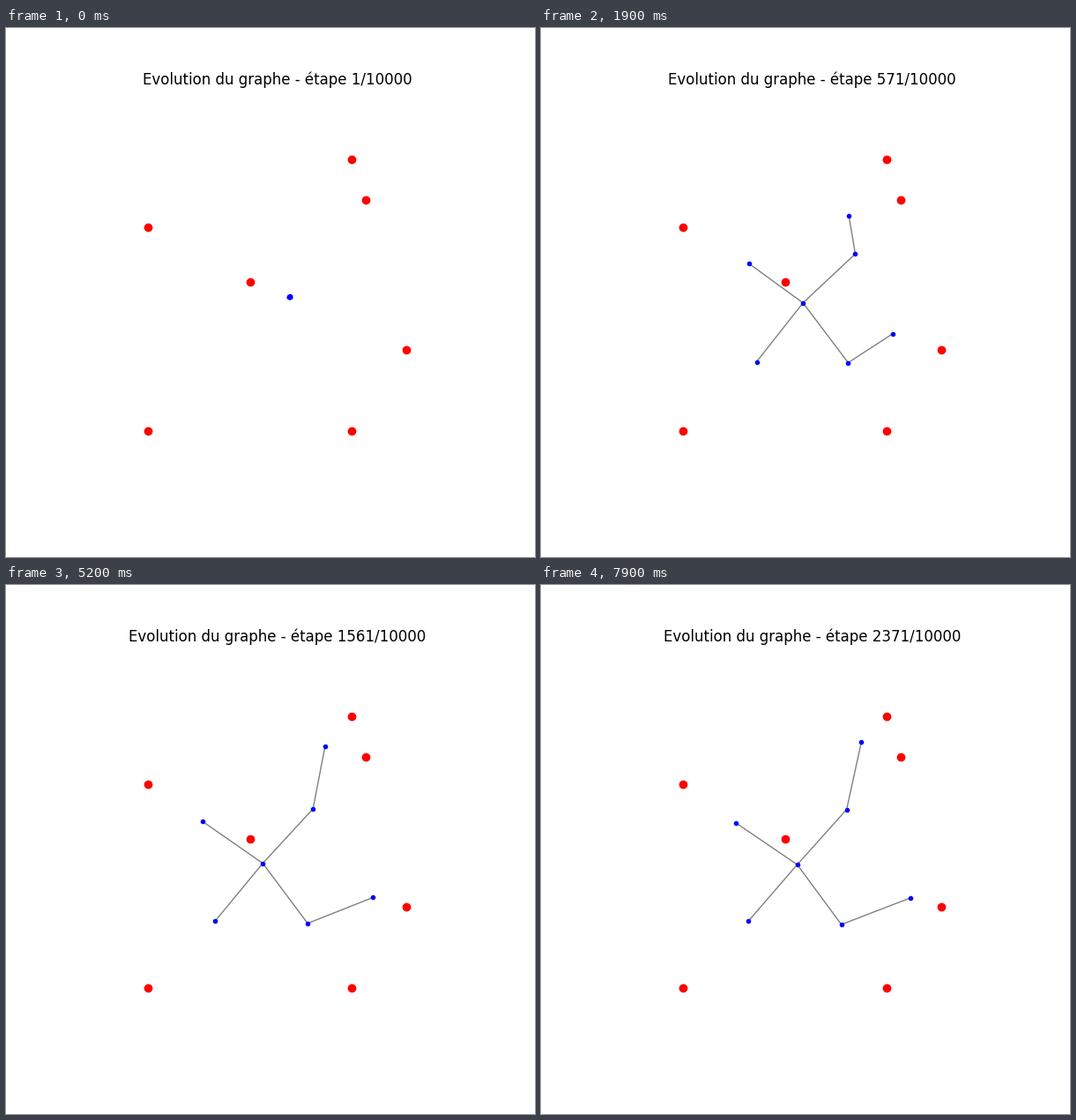
Recreate the animation shown at these times as a matplotlib script. Size 600 by 600 pixels, loop 8 s.

```python
import numpy as np
import matplotlib.pyplot as plt
from matplotlib.animation import FuncAnimation
from matplotlib.collections import LineCollection
from itertools import combinations

SIZE, FRAMES, INTERVAL = 600, 80, 100
STEPS_PER_FRAME, TOTAL = 30, 10000
REACH = 85           # longest possible link, in pixels
SPREAD_TIME = 10     # frames of free flight before the tethers go taut
SPREAD_RATE = 0.062  # how fast nodes fly apart
SETTLE_TIME = 18     # time constant of the drift to rest

targets = np.array([(392, 149), (408, 195), (161, 226), (277, 288),
                    (454, 365), (161, 457), (392, 457)])

# Hub first, then each node after the one it is tethered to
parents = [None, 0, 0, 0, 0, 2, 3]
start = np.array((321, 305))
spread = np.array([(305, 308), (258, 271), (356, 264), (349, 366),
                   (258, 369), (337, 246), (375, 335)])  # at frame 8
rest = np.array([(290, 317), (220, 269), (346, 254), (341, 385),
                 (235, 382), (364, 177), (420, 356)])

rng = np.random.default_rng(4)
wobble = rng.uniform(-0.7, 0.7, (FRAMES, len(parents), 2))


def fly_out(t):
    ease = np.expm1(-SPREAD_RATE * t) / np.expm1(-SPREAD_RATE * 8)
    return start + (spread - start) * ease


def positions(i):
    pos = fly_out(min(i, SPREAD_TIME))
    if i > SPREAD_TIME:
        decay = np.exp((SPREAD_TIME - i) / SETTLE_TIME)
        pos = rest + (pos - rest) * decay
    pos = pos + wobble[i]
    for child, parent in enumerate(parents[1:], 1):
        arm = pos[child] - pos[parent]
        pos[child] = pos[parent] + arm * min(1, REACH / np.hypot(*arm))
    return pos


def links(pos):
    return [(a, b) for a, b in combinations(pos, 2)
            if np.hypot(*(a - b)) < REACH + 0.1]


fig = plt.figure(figsize=(SIZE / 100, SIZE / 100), dpi=100, facecolor="white")
ax = fig.add_axes([0, 0, 1, 1])
ax.set_xlim(0, SIZE)
ax.set_ylim(SIZE, 0)
ax.axis("off")

edges = LineCollection([], colors="gray", linewidths=1, zorder=1)
ax.add_collection(edges)
ax.plot(*targets.T, "o", color="red", markersize=6, zorder=2)
nodes, = ax.plot([], [], "o", color="blue", markersize=3, zorder=3)
title = fig.text(0.5125, 0.88 + 6 / 72 / 6, "", ha="center", va="baseline",
                 fontsize=12, family="DejaVu Sans")


def update(i):
    pos = positions(i)
    edges.set_segments(links(pos))
    nodes.set_data(*pos.T)
    step = 1 + STEPS_PER_FRAME * i
    title.set_text(f"Evolution du graphe - étape {step}/{TOTAL}")
    return edges, nodes, title


anim = FuncAnimation(fig, update, frames=FRAMES, interval=INTERVAL,
                     repeat=True, repeat_delay=0)
plt.show()
```
